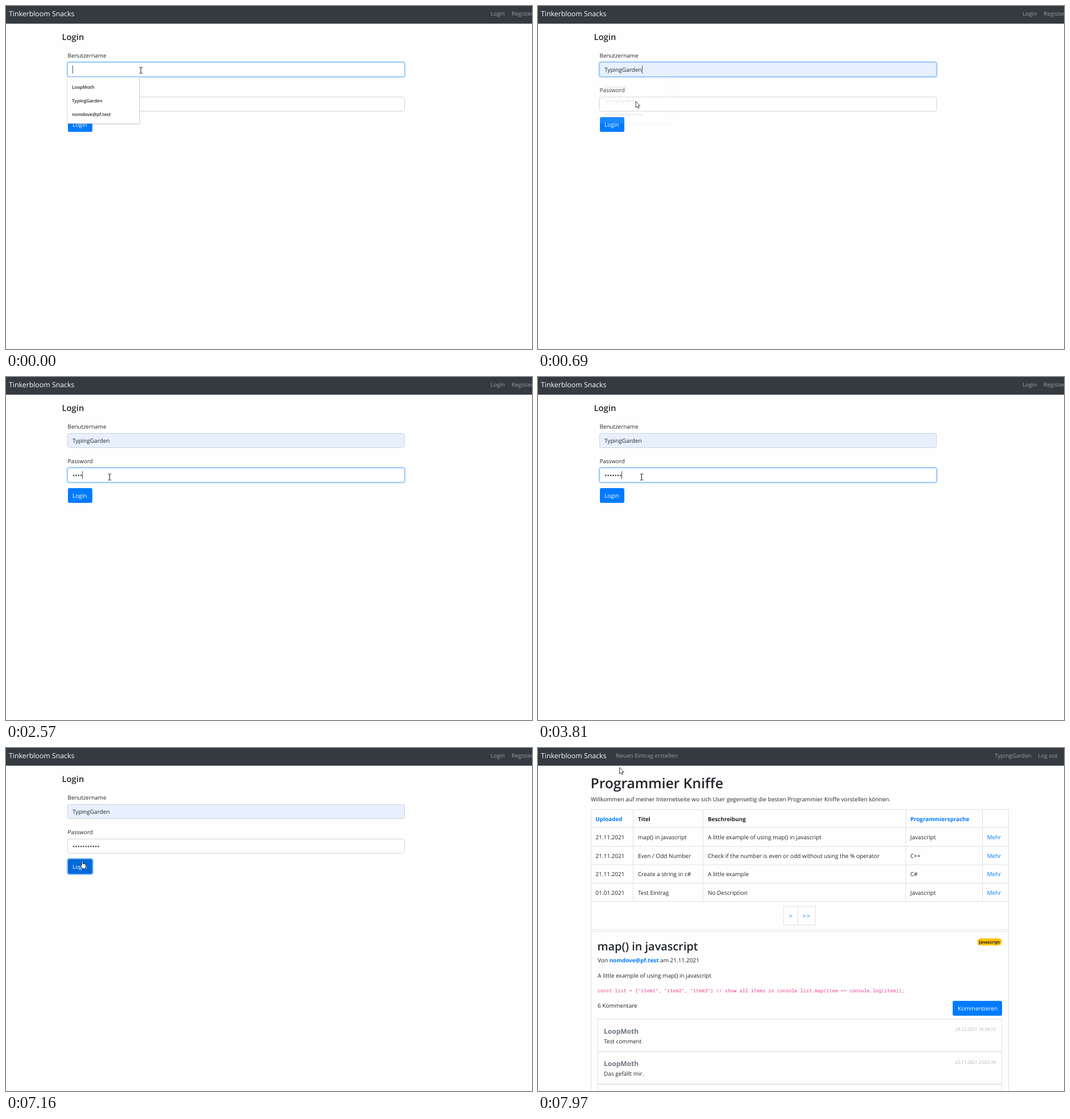
An HTML page for the animation above (8000 ms loop, 926x605 px).

```html
<!DOCTYPE html>
<html lang="de">
<head>
<meta charset="utf-8">
<title>Login</title>
<style>
html, body { margin: 0; width: 100%; height: 100%; overflow: hidden; background: #fefefe; }
svg { display: block; width: 100%; height: 100%; }
text { font: 10.05px "Open Sans", "Noto Sans", sans-serif; fill: #212529; text-rendering: geometricPrecision; white-space: pre; }
.brand { font-size: 12.33px; fill: #fff; }
.nav { font-size: 9.95px; fill: #999da0; }
.label { font-size: 9.87px; }
.h1 { font-size: 24.6px; font-weight: 600; }
.h2 { font-size: 19.9px; font-weight: 600; }
.h4 { font-size: 14.8px; font-weight: 600; }
.h5 { font-size: 12px; font-weight: 700; fill: #6c757d; }
.b { font-size: 9.87px; font-weight: 700; }
.link { fill: #007bff; }
.pager { fill: #007bff; letter-spacing: 1.6px; }
.white { fill: #fff; }
.item { font-size: 8px; font-weight: 600; }
.small { font-size: 8.25px; }
.badge { font-size: 7.4px; font-weight: 700; }
.date { font-size: 7.9px; font-style: italic; fill: #b3b7bb; text-anchor: end; }
.code { font: 8.5px "Noto Sans Mono", "DejaVu Sans Mono", monospace; fill: #e83e8c; }
.line { fill: none; stroke: #dee2e6; }
.ring { fill: none; stroke: #007bff; stroke-opacity: .25; stroke-width: 2.2; }
.caret { stroke: #495057; }
.cursor { fill: #fff; stroke: #111; stroke-width: .8; stroke-linejoin: round; }
</style>
</head>
<body>
<svg id="stage" viewBox="0 0 926 605" preserveAspectRatio="none"></svg>
<script>
const LOOP = 8000;
const BRAND = 'Tinkerbloom Snacks', USER = 'TypingGarden', GURU = 'LoopMoth', MAIL = 'nomdove@pf.test';
const stage = document.getElementById('stage');

const text = (x, y, s, cls = '', id = '') =>
  `<text x="${x}" y="${y}" class="${cls}" id="${id}">${s.replace(/>/g, '&gt;')}</text>`;
const rect = (x, y, w, h, attrs = '') =>
  `<rect x="${x}" y="${y}" width="${w}" height="${h}" ${attrs}/>`;
const path = (d, cls = 'line') => `<path d="${d}" class="${cls}"/>`;

const field = (id, y) =>
  rect(107.4, y - 1.1, 595.2, 27.2, `rx="3.8" class="ring" id="${id}Ring"`) +
  rect(108.5, y, 593, 25, `rx="2.7" fill="#fff" stroke="#ced4da" id="${id}"`);

const loginPage = () => {
  const items = [GURU, USER, MAIL].map((s, i) => text(116, 146 + 24 * i, s, 'item')).join('');
  let dots = '';
  for (let i = 0; i < 11; i++) dots += `<circle cx="${119.3 + 4.33 * i}" cy="173.7" r="1.35" fill="#495057"/>`;
  return text(853, 17, 'Login', 'nav') + text(890, 17, 'Register', 'nav') +
    text(98.5, 60.3, 'Login', 'h4') +
    text(108.5, 91, 'Benutzername', 'label') + field('user', 99.5) +
    text(117, 116, '', '', 'name') +
    text(108.5, 152, 'Password', 'label') + field('pass', 160.5) +
    `<g id="dots">${dots}</g>` +
    rect(108, 195, 45, 28, 'rx="3.8" fill="none" stroke="#268fff" stroke-width="2.2" id="btnRing"') +
    rect(109, 196, 43, 26, 'rx="2.7" id="btn"') + text(117, 213, 'Login', 'white') +
    '<g id="menu">' +
    rect(107.5, 126.5, 128.5, 82.5, 'rx="2" fill="#000" opacity=".13"') +
    rect(108, 125.5, 127, 82, 'rx="1" fill="#fff" stroke="#000" stroke-opacity=".1" stroke-width=".8"') +
    rect(108, 131, 127, 23.8, 'fill="#e6e6e6" id="hover"') + items + '</g>' +
    '<path id="caret" class="caret"/>';
};

const tablePart = () => {
  const cols = [101.3, 176, 299, 655.5, 790.5];
  const rows = [
    ['21.11.2021', 'map() in javascript', 'A little example of using map() in javascript', 'Javascript'],
    ['21.11.2021', 'Even / Odd Number', 'Check if the number is even or odd without using the % operator', 'C++'],
    ['21.11.2021', 'Create a string in c#', 'A little example', 'C#'],
    ['01.01.2021', 'Test Eintrag', 'No Description', 'Javascript']
  ];
  let out = ['Uploaded', 'Titel', 'Beschreibung', 'Programmiersprache']
    .map((s, i) => text(cols[i], 129, s, i % 3 ? 'b' : 'b link')).join('');
  rows.forEach((row, r) => [...row, 'Mehr'].forEach((s, i) => {
    out += text(cols[i], 161 + 32.5 * r, s, i === 4 ? 'link' : '');
  }));
  out += rect(93.5, 108.5, 735, 212, 'class="line"');
  out += path('M93.5 140.5h735m-735 33h735m-735 32.5h735m-735 32.5h735m-735 32h735');
  out += path('M167.5 108.5v162m123-162v162m357-162v162m135-162v162');
  return out + rect(432.5, 279.5, 56, 33, 'class="line"') + path('M457.5 279.5v33') +
    text(442, 300, '>', 'pager') + text(466, 300, '>>', 'pager');
};

const comment = (y, s, date) =>
  rect(105, y, 711.5, 57, 'class="line"') + text(116, y + 25.5, GURU, 'h5') +
  text(116, y + 42.5, s) + text(805.5, y + 21, date, 'date');

const homePage = () =>
  text(137, 17, 'Neuen Eintrag erstellen', 'nav') +
  text(804, 17, USER, 'nav') + text(880, 17, 'Log out', 'nav') +
  text(92.5, 70.5, 'Programmier Kniffe', 'h1') +
  text(93, 93.7, 'Willkommen auf meiner Internetseite wo sich User gegenseitig die besten Programmier Kniffe vorstellen können.') +
  tablePart() +
  rect(93.5, 323.5, 735, 300, 'class="line"') +
  text(104.5, 357, 'map() in javascript', 'h2') +
  rect(773.3, 335.8, 43.5, 12.4, 'rx="6.2" fill="#ffc107"') + text(776.5, 344.8, 'Javascript', 'badge') +
  `<text x="105" y="378">Von <tspan class="b link">${MAIL}</tspan> am 21.11.2021</text>` +
  text(105, 404.7, 'A little example of using map() in javascript') +
  text(104.7, 431.3, 'const list = ["item1", "item2", "item3"] // show all items in console list.map(item => console.log(item));', 'code') +
  text(105, 458, '6 Kommentare') +
  rect(730, 446, 87, 26.3, 'rx="2.7" fill="#007bff"') + text(739, 463, 'Kommentieren', 'white') +
  comment(478, 'Test comment', '29.12.2021 16:39:13') +
  comment(535.7, 'Das gefällt mir.', '22.11.2021 23:03:34') +
  rect(105, 593.5, 711.5, 57, 'class="line"');

const cursors =
  '<g id="cursor"><path id="arrow" class="cursor" d="M0 0V11.3L2.6 8.9 4.3 12.6 6 11.9 4.4 8.2H7.8Z"/>' +
  '<path id="beam" fill="none" stroke="#111" d="M-2.7 -5.3H-.8L0 -4.7 .8 -5.3H2.7M0 -4.7V4.7M-2.7 5.3H-.8L0 4.7 .8 5.3H2.7"/>' +
  '<path id="hand" class="cursor" d="M0 1Q1.1 -.6 2.1 1V5Q3.3 4 4 5.2 5.2 4.4 5.9 5.7 7.3 5.2 7.5 6.6V9.5L6.3 13.3H1.3L-1.8 8.6Q-2 7 -.6 7.4L0 8Z"/></g>';

stage.innerHTML =
  rect(0, 0, 926, 605, 'fill="#fefefe"') + rect(0, 0, 926, 31.2, 'fill="#343a40"') +
  text(5, 18, BRAND, 'brand') +
  `<g id="login">${loginPage()}</g><g id="home">${homePage()}</g>` + cursors;

const $ = id => document.getElementById(id);
const set = (id, attrs) => { for (const k in attrs) $(id).setAttribute(k, attrs[k]); };
const show = (id, on) => set(id, { visibility: on ? 'inherit' : 'hidden' });

// Last entry whose start time has been reached.
const step = (list, t) => list.filter(e => e[0] <= t).pop();

// time, x, y, shape
const POINTER = [
  [0, 237.5, 113.5, 'beam'], [130, 192, 147, 'arrow'], [280, 168, 163.5, 'arrow'],
  [690, 172, 168, 'arrow'], [840, 180, 175, 'beam'], [970, 182.5, 176.5, 'beam'],
  [6500, 176, 178, 'beam'], [6620, 161.5, 182, 'beam'], [6770, 133.2, 199.5, 'hand'],
  [7310, 133.5, 198.5, 'arrow'], [7590, 172, 129.3, 'arrow'], [7730, 160, 90, 'arrow'],
  [7850, 148, 52, 'arrow'], [7970, 143.5, 34.3, 'arrow']
];
// time, dots typed, caret visible
const TYPING = [
  [0, 0, 0], [1120, 0, 1], [1580, 0, 0], [1990, 1, 1], [2140, 2, 1], [2570, 4, 1], [2690, 5, 1],
  [3260, 5, 0], [3400, 6, 1], [3810, 7, 1], [4270, 9, 1], [4830, 10, 1], [5390, 10, 0],
  [5660, 11, 1], [6230, 11, 0], [6770, 11, 1], [6920, 11, 0]
];
const MENU = [[0, 1], [560, .45], [690, .1], [840, 0]];
// time, fill, ring opacity
const BUTTON = [[0, '#007bff', 0], [6920, '#0073ef', 0], [7040, '#0069d9', .25], [7160, '#0069d9', .5]];

function focus(id, on, filled) {
  show(id + 'Ring', on);
  set(id, { stroke: on ? '#80bdff' : '#ced4da', fill: filled ? '#e8f0fe' : '#fff' });
}

function render(t) {
  const home = t >= 7310;
  show('login', !home);
  show('home', home);

  focus('user', t < 1120, t >= 130);
  focus('pass', t >= 1120 && t < 7160, false);
  $('name').textContent = t < 130 ? '' : t < 280 ? GURU : USER;
  set('name', { class: t < 560 ? 'small' : '' });

  set('menu', { opacity: step(MENU, t)[1] });
  show('hover', t >= 130 && t < 690);
  set('hover', { y: t < 280 ? 131 : 154.8 });

  const [, n, blink] = step(TYPING, t);
  [...$('dots').children].forEach((dot, i) => dot.setAttribute('visibility', i < n ? 'inherit' : 'hidden'));
  const inUser = t < 130 || (t >= 560 && t < 840);
  const x = t < 130 ? 117.5 : inUser ? 183.5 : 117.5 + Math.round(4.33 * n);
  set('caret', { d: `M${x} ${inUser ? 105 : 166}v14` });
  show('caret', !home && (inUser || blink));

  const [, fill, ring] = step(BUTTON, t);
  set('btn', { fill });
  set('btnRing', { 'stroke-opacity': ring });

  const [, px, py, shape] = step(POINTER, t);
  set('cursor', { transform: `translate(${px} ${py})` });
  for (const id of ['arrow', 'beam', 'hand']) show(id, id === shape);
}

const start = performance.now();
function tick() {
  render((performance.now() - start) % LOOP);
  requestAnimationFrame(tick);
}
tick();
</script>
</body>
</html>
```
